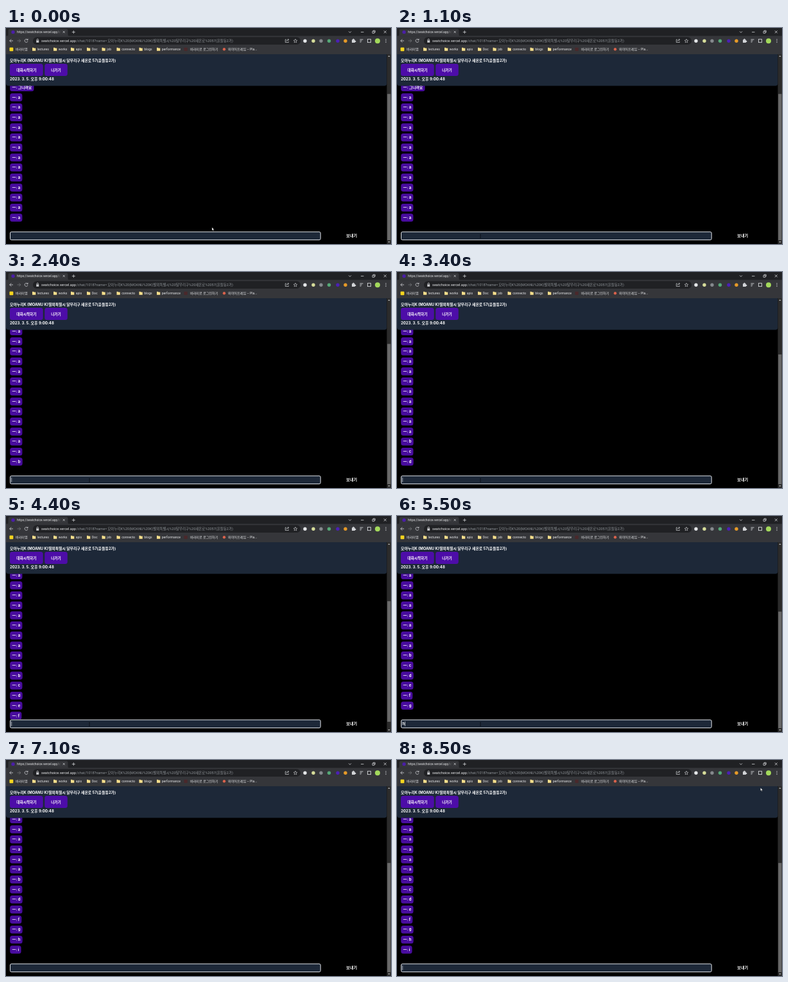
Recreate the animation shown at these times as an HTML page. Size 600x338 px, loop 8.6 s.

```html
<!DOCTYPE html>
<html lang="ko">
<head>
<meta charset="utf-8">
<title>Chat</title>
<style>
html, body { margin: 0; width: 100%; height: 100%; overflow: hidden; background: #000; }
svg { display: block; width: 100vw; height: 100vh; }
text { fill: #fff; white-space: pre; }
.ui { font: 5.6px Roboto, "Noto Sans CJK KR", sans-serif; }
.ui text { fill: #e6e7e9; }
.ui .dim { fill: #8f9499; }
.tab text { font-size: 4.9px; }
.marks text { font-size: 5.1px; }
.page { font: 700 5.85px Inter, "Noto Sans CJK KR", sans-serif; }
.mid { text-anchor: middle; }
.line { fill: none; stroke: #d2d4d7; stroke-width: .8; }
</style>
</head>
<body>
<svg viewBox="0 0 600 338" preserveAspectRatio="none">
  <defs>
    <clipPath id="tabClip"><rect x="17" width="69" height="12"/></clipPath>
    <linearGradient id="tabFade">
      <stop stop-color="#35363a" stop-opacity="0"/><stop offset="1" stop-color="#35363a"/>
    </linearGradient>
    <path id="folder" d="M0 0h2l.7.8h2.6v4.2h-5.3z" fill="#f8df8c"/>
  </defs>
  <rect width="600" height="338"/>

  <g class="page">
    <g id="messages"></g>
    <path d="M0 41H593.5V86.5q0 4-4 4H4q-4 0-4-4z" fill="#1d2838"/>
    <text x="6" y="53.4">모아누리K (MOANU K)별뫼특별시 달무리구 새온로 57(윤들동2가)</text>
    <g fill="#4d0da8">
      <rect x="6" y="56" width="51.7" height="19" rx="3.5"/>
      <rect x="60.2" y="56" width="35.6" height="19" rx="3.5"/>
    </g>
    <g class="mid" font-weight="600" font-size="5.7">
      <text x="31.9" y="67.5">대화시작하기</text>
      <text x="78" y="67.5">나가기</text>
    </g>
    <text x="6" y="81.7" font-size="6">2023. 3. 5. 오후 9:00:48</text>

    <rect y="318" width="593.5" height="20"/>
    <rect x="6.5" y="319" width="483.7" height="12.6" rx="2" fill="#1d2838" stroke="#e2e5ea"/>
    <text id="typed" x="8.3" y="327.4"></text>
    <rect id="caret" y="321.6" width=".7" height="7.2" fill="#e8ebf0"/>
    <text class="mid" x="538.7" y="327.3" font-size="6.1">보내기</text>
  </g>

  <g>
    <rect x="593.5" y="40" width="6.5" height="298" fill="#2b2b2b"/>
    <rect id="thumb" x="594.2" width="5.1" fill="#6a6a6a"/>
    <path d="M595.2 45l1.7-2 1.7 2zM595.2 334l1.7 2 1.7-2z" fill="#b5b5b5"/>
  </g>

  <g class="ui">
    <rect width="600" height="41" fill="#35363a"/>
    <rect width="600" height="12.3" fill="#202124"/>
    <g class="tab">
      <path d="M1 12.4q2.5 0 2.5-2.5V4q0-2.5 2.5-2.5H94q2.5 0 2.5 2.5v5.9q0 2.5 2.5 2.5z" fill="#35363a"/>
      <circle cx="11" cy="6.4" r="2.7" fill="#4a1fa6"/>
      <text x="17" y="8.2" clip-path="url(#tabClip)">https://seatchoice.vercel.app/chat</text>
      <rect x="78" y="2" width="8" height="9" fill="url(#tabFade)"/>
    </g>
    <g class="line">
      <path d="M88.7 4.8l3 3m0-3l-3 3M102.8 6.4h5m-2.5-2.5v5"/>
      <path d="M534 5.3l2 2 2-2M553 6.4h4.5M588.8 4.2l4 4m0-4l-4 4"/>
      <path d="M571 5.2h3v3h-3zM572.2 5V4h3v3h-1"/>
      <path d="M11 20H5.7m2.5-2.5L5.7 20l2.5 2.5"/>
      <path d="M17.5 20h5.3m-2.5-2.5l2.5 2.5-2.5 2.5" stroke="#77797d"/>
      <path d="M33.6 18.4a2.5 2.5 0 1 0 .4 2.3M34 16.8v2h-2"/>
    </g>
    <rect x="42" y="14.3" width="417" height="11.8" rx="5.9" fill="#202124"/>
    <path d="M47.2 19.3h4v3.5h-4z" fill="#c8cacd"/>
    <path class="line" d="M48 19.3v-1a1.2 1.2 0 0 1 2.4 0v1" stroke-width=".6"/>
    <text x="55" y="22.1">seatchoice.vercel.app</text>
    <text class="dim" x="109.5" y="22.1">/chat/1018?name=</text>
    <text class="dim" x="158.3" y="22.1" font-size="5.5">모아누리K%20(MOANU%20K)별뫼특별시%20달무리구%20새온로%2057(윤들동2가)</text>
    <g class="line">
      <path d="M437 18h-1.7v4.5h5V21M437 21q0-2.7 3.5-2.7m-1.4-1.5l1.7 1.5-1.7 1.5" stroke-width=".7"/>
      <path d="M451 17.2l.8 2 2.1.1-1.6 1.4.5 2.1-1.8-1.1-1.8 1.1.5-2.1-1.6-1.4 2.1-.1z" stroke-width=".6"/>
      <path d="M551.5 18h5m-5 2h3m-3 2h2" stroke-width=".9"/>
      <rect x="563.5" y="17.6" width="5" height="5" stroke-width=".9"/>
    </g>
    <g id="extensions"></g>
    <path d="M539 18.3h1.4a1.1 1.1 0 1 1 2.1 0h1.3v1.6a1.1 1.1 0 1 1 0 2v1.2H539z" fill="#d2d4d7"/>
    <g fill="#d2d4d7"><circle cx="592" cy="18" r=".65"/><circle cx="592" cy="20.2" r=".65"/><circle cx="592" cy="22.4" r=".65"/></g>
    <g class="marks" id="marks">
      <rect x="5.5" y="30.5" width="5.8" height="5.8" rx="1" fill="#f4d51f"/>
      <text x="15" y="35.2">바라미앱</text>
      <rect x="277.5" y="30.7" width="5.2" height="5.2" fill="#4a282b"/>
      <text x="287" y="35.2">바라미로 로그인하기</text>
      <circle cx="340" cy="33.3" r="2.2" fill="#d9624c"/>
      <text x="346" y="35.2">와이어프레임 – Pla...</text>
    </g>
  </g>

  <path id="arrow" d="M0 0v4.8l1.1-1 .8 1.8.8-.4-.8-1.7h1.5z" fill="#fff" stroke="#222" stroke-width=".3"/>
  <path id="beam" d="M129.2 323.4h1.8m-.9 0v4.8m-.9 0h1.8" fill="none" stroke="#05080d" stroke-width=".6"/>
</svg>
<script>
const LOOP = 8600, STEP = 100, ROW = 15.69, BLINK = 500;
const START_ROWS = 14;
const sends = [1400, 2750, 3300, 3850, 4400, 5050, 5700, 6450];
const letters = 'bcdefghi';
const TYPE_LEAD = 250;
const $ = id => document.getElementById(id);

function add(parent, tag, attrs, content = '') {
  const el = document.createElementNS('http://www.w3.org/2000/svg', tag);
  for (const key in attrs) el.setAttribute(key, attrs[key]);
  el.textContent = content;
  parent.append(el);
  return el;
}

[[41, 'lectures'], [74, 'works'], [101, 'apis'], [126, 'Doc'], [149.5, 'job'],
 [172.5, 'connecto'], [207.5, 'blogs'], [235, 'performance']].forEach(([x, name]) => {
  add($('marks'), 'use', { href: '#folder', x, y: 30.8 });
  add($('marks'), 'text', { x: x + 7.7, y: 35.2 }, name);
});

[[466, '#e4e6e8'], [479, '#d6dc9a'], [491, '#85898d'], [503.5, '#55a877'],
 [517, '#4b20b5'], [529, '#e69a28'], [579, '#a3d95c', 4]].forEach(([cx, fill, r = 2.7]) =>
  add($('extensions'), 'circle', { cx, cy: 20.2, r, fill }));

const rows = ['그니까요', ...Array(START_ROWS - 1).fill('a'), ...letters].map((word, i) => {
  const row = add($('messages'), 'g', { transform: `translate(6.2 ${92.8 + i * ROW})` });
  const box = add(row, 'rect', { y: -6.2, height: 12.4, rx: 3.5, fill: '#480c9e' });
  const label = add(row, 'text', { x: 3.3, y: 2.1 }, '一: ' + word);
  box.setAttribute('width', label.getComputedTextLength() + 6.6);
  return row;
});

const ease = p => p * p * (3 - 2 * p);
const progress = (t, from, to) => ease(Math.min(1, Math.max(0, (t - from) / (to - from))));
const mix = (a, b, p) => a + (b - a) * p;
const show = (el, visible) => el.style.display = visible ? '' : 'none';

function drawPointer(t) {
  const arriving = t < 1000, leaving = t >= 7300;
  const p = leaving ? progress(t, 7200, 8100) : progress(t, 0, 1000);
  const [x, y] = leaving
    ? [mix(130, 566.5, p), mix(326, 43.5, p)]
    : [mix(321, 130, p), mix(312, 326, p)];
  $('arrow').setAttribute('transform', `translate(${x} ${y})`);
  show($('arrow'), arriving || leaving);
  show($('beam'), !arriving && t < 7000);
}

function draw(t) {
  const sent = sends.filter(s => s <= t).length;
  const scrolled = sends.filter(s => s + STEP <= t).length;
  rows.forEach((row, i) => show(row, i < START_ROWS + sent));
  $('messages').setAttribute('transform', `translate(0 ${-scrolled * ROW})`);

  // Scrollbar geometry follows the growing page height.
  const view = 297, track = 285, startHeight = 370;
  const height = startHeight + sent * ROW;
  const offset = startHeight + scrolled * ROW - view;
  $('thumb').setAttribute('y', 47 + track * offset / height);
  $('thumb').setAttribute('height', track * view / height);

  const typing = sent < sends.length && t >= sends[sent] - TYPE_LEAD;
  const keyTime = typing ? sends[sent] - TYPE_LEAD : sent ? sends[sent - 1] : -BLINK;
  $('typed').textContent = typing ? letters[sent] : '';
  $('caret').setAttribute('x', 8.4 + (typing ? $('typed').getComputedTextLength() : 0));
  show($('caret'), Math.floor((t - keyTime) / BLINK) % 2 === 0);
  drawPointer(t);
}

const began = performance.now();
function tick() {
  const t = (performance.now() - began) % LOOP;
  draw(Math.floor(t / STEP) * STEP);
  requestAnimationFrame(tick);
}
tick();
</script>
</body>
</html>
```
